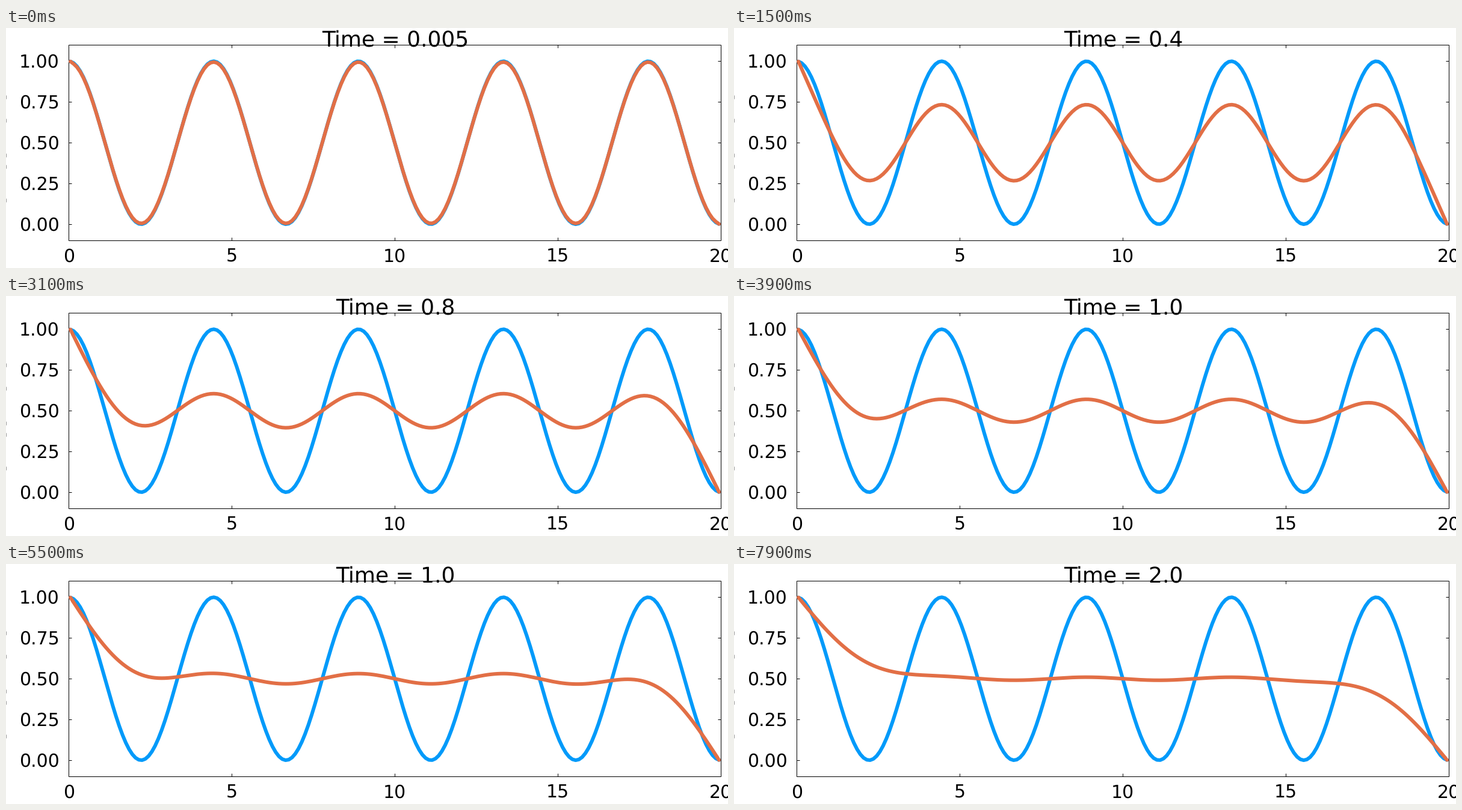
A matplotlib script that plays this animation: 1200x400 px, repeating every 8000 ms.

```python
import math

import matplotlib.pyplot as plt
import numpy as np
from matplotlib.animation import FuncAnimation

W, H, DPI = 1200, 400, 100
LEFT, RIGHT, TOP, BOTTOM = 104.3, 1187.8, 28.2, 354.2
FRAMES, INTERVAL = 80, 100
LENGTH, CELLS = 20, 200
DT, STEPS_PER_FRAME = 0.005, 5

plt.rcParams["font.family"] = "DejaVu Sans"
plt.rcParams["text.hinting"] = "no_hinting"


def pt(px):
    return px * 72 / DPI


def to_x(x):
    return LEFT + (RIGHT - LEFT) * x / LENGTH


def to_y(u):
    return BOTTOM - (BOTTOM - TOP) * (u + 0.1) / 1.2


def diffuse():
    """Heat equation with fixed end cells; returns grid, start and states."""
    dx = LENGTH / CELLS
    x = (np.arange(CELLS) + 0.5) * dx
    start = 0.5 + 0.5 * np.cos(9 * np.pi * x / LENGTH)
    u, states = start.copy(), []
    for step in range(FRAMES * STEPS_PER_FRAME):
        u[1:-1] += DT / dx**2 * (u[2:] - 2 * u[1:-1] + u[:-2])
        if step % STEPS_PER_FRAME == 0:
            states.append(u.copy())
    return x, start, states


def time_label(i):
    """Elapsed time rounded to one significant digit."""
    t = round(DT * (1 + STEPS_PER_FRAME * i), 6)
    scale = 10 ** -math.floor(math.log10(t))
    return f"Time = {float(round(round(t * scale, 6)) / scale)}"


fig = plt.figure(figsize=(W / DPI, H / DPI), dpi=DPI, facecolor="white")
ax = fig.add_axes([0, 0, 1, 1])
ax.set_xlim(0, W)
ax.set_ylim(H, 0)
ax.axis("off")


def rule(xs, ys, color="black"):
    ax.plot(xs, ys, color=color, lw=pt(1), solid_capstyle="butt", zorder=1)


def curve(x, u, color):
    return ax.plot(to_x(x), to_y(u), color=color, lw=pt(6),
                   solid_capstyle="round", solid_joinstyle="round", zorder=2)[0]


def label(x, y, text, size, ha="center"):
    return ax.text(x, y, text, fontsize=pt(size), ha=ha, va="baseline", zorder=3)


for y in (TOP, BOTTOM):
    rule([LEFT, RIGHT], [y, y])
for x in (LEFT, RIGHT):
    rule([x, x], [TOP, BOTTOM])

for v in (0, 5, 10, 15, 20):
    px = to_x(v)
    rule([px, px], [TOP, TOP + 5])
    rule([px, px], [BOTTOM, BOTTOM - 5])
    label(px + 0.2, 390, str(v), 30)

for v in (0, 0.25, 0.5, 0.75, 1):
    py = to_y(v)
    rule([LEFT, LEFT + 5], [py, py])
    rule([RIGHT, RIGHT - 5], [py, py])
    label(89, py + 10.2, f"{v:.2f}", 30, ha="right")

# Sliver of the axis label cut off by the left edge
for y in (115, 154, 212, 231, 287):
    rule([0.2, 0.2], [y - 3, y + 3], "#999999")

grid, start, states = diffuse()
curve(grid, start, "#009AFA")
heat = curve(grid, states[0], "#E26F46")
title = label(647.5, 30, time_label(0), 36)


def draw(i):
    heat.set_ydata(to_y(states[i]))
    title.set_text(time_label(i))
    return heat, title


anim = FuncAnimation(fig, draw, frames=FRAMES, interval=INTERVAL,
                     init_func=lambda: draw(0), repeat=True, repeat_delay=0)
plt.show()
```
